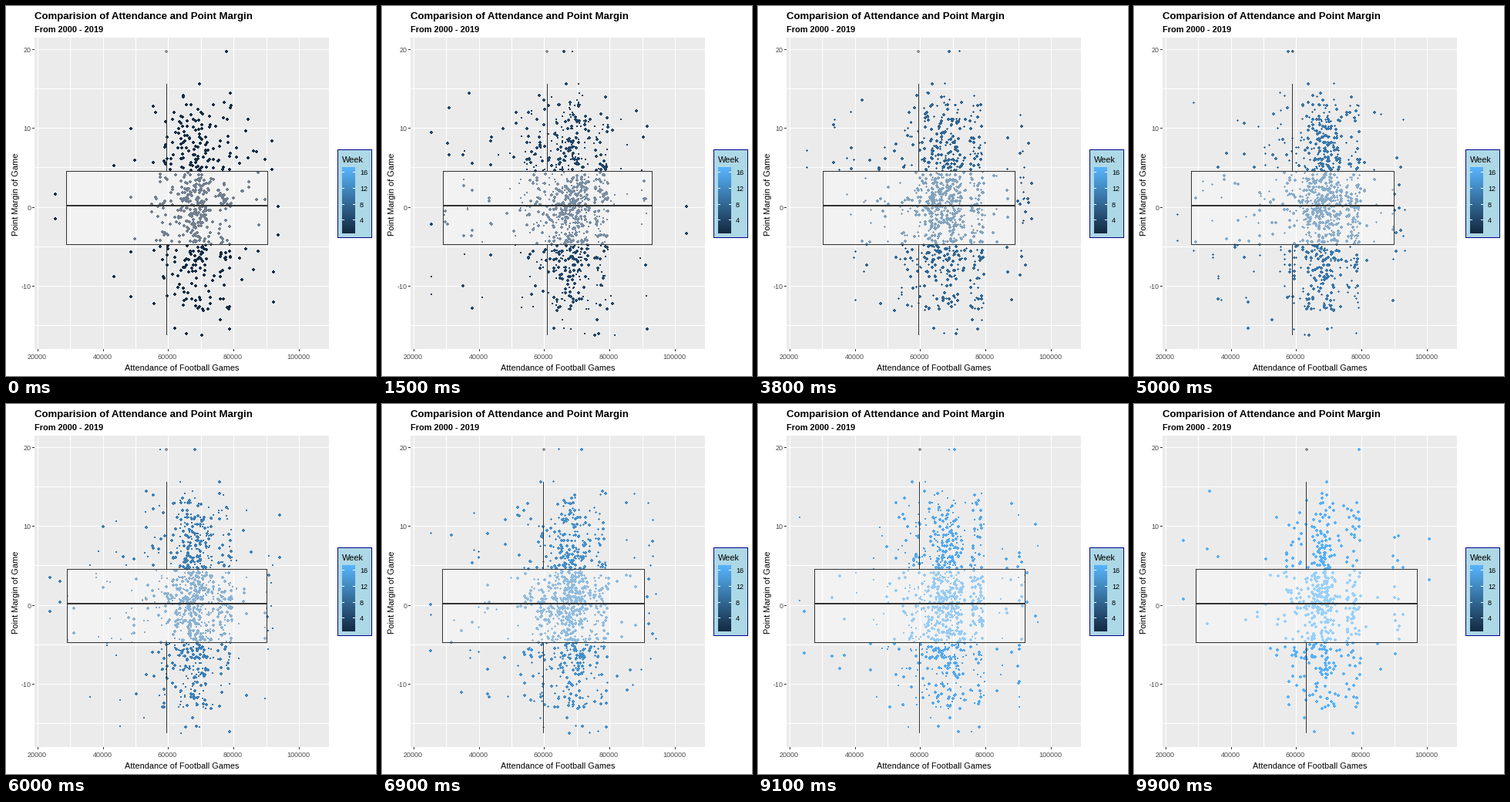
A matplotlib script that plays this animation: 480 by 480 pixels, repeating every 10000 ms.

```python
import numpy as np
import matplotlib.pyplot as plt
from matplotlib.animation import FuncAnimation
from matplotlib.collections import PolyCollection
from matplotlib.patches import Rectangle

plt.rcParams["font.family"] = ["Liberation Sans", "DejaVu Sans"]

FRAMES, WEEKS, TEAMS = 100, 17, 580
LOW, HIGH = np.array([19, 43, 67]) / 255, np.array([86, 177, 247]) / 255
DARK = "#333333"

# Per week, in pixels: attendance extremes and the top team's place
LO = [63.5, 54, 64, 63.5, 55, 59, 64, 98, 56.5, 80, 57, 64, 63, 64.5, 54, 60, 64.5]
HI = [353, 402, 342.5, 395, 353, 353, 345, 355, 352, 346, 355, 355, 351, 363, 363, 360, 383]
TOP = [286, 240, 247, 235.5, 250, 232, 261, 248, 205, 200, 245, 230, 259, 236, 248, 255, 292]
KEYS = np.floor(np.arange(WEEKS) * (FRAMES - 1) / (WEEKS - 1) + 0.4999).astype(int)


def px(v):
    return 41.2 + (v - 20000) * 0.00424


def py(v):
    return 261.02 - v * 10.23


def week_color(w):
    return LOW + (HIGH - LOW) * w / (WEEKS - 1)


fig = plt.figure(figsize=(480 / 72, 480 / 72), dpi=72, facecolor="white")
ax = fig.add_axes([0, 0, 1, 1])
ax.set(xlim=(0, 480), ylim=(480, 0))
ax.axis("off")


def bar(x0, y0, x1, y1, color, z=1, alpha=None):
    r = Rectangle((x0, y0), x1 - x0, y1 - y0, fc=color, lw=0, alpha=alpha,
                  antialiased=False, zorder=z)
    return ax.add_patch(r)


def move(r, x0, y0, x1, y1):
    r.set_bounds(x0, y0, x1 - x0, y1 - y0)


def label(x, y, s, size, color="black", **kw):
    ax.text(x, y, s, fontsize=size, color=color, zorder=9, **kw)


# Panel, grid and axes
bar(37, 41, 419, 445, "#EBEBEB")
for v in range(-15, 21, 5):
    y = int(py(v))
    bar(37, y, 419, y + 1, "white", 2)
    if v % 10 == 0:
        bar(34, y, 37, y + 1, DARK, 2)
        label(32.5, y + 4, str(v), 9, "#4D4D4D", ha="right")
for v in range(20000, 100001, 10000):
    x = int(px(v))
    bar(x, 41, x + 1, 445, "white", 2)
    if v % 20000 == 0:
        bar(x, 445, x + 1, 448, DARK, 2)
        label(x - 0.5, 458, str(v), 9, "#4D4D4D", ha="center")

label(37, 17, "Comparision of Attendance and Point Margin", 13.3, weight="bold")
label(37, 34, "From 2000 - 2019", 11, weight="bold")
label(228, 473, "Attendance of Football Games", 10.9, ha="center")
label(18, 244.5, "Point Margin of Game", 11, rotation=90, ha="right", va="center")

# Legend
bar(430, 186, 475, 301, "#00008B", 1)
bar(431, 187, 474, 300, "#ADD8E6", 2)
label(436, 203, "Week", 11)
for y in range(209, 295):
    t = np.clip(((295 - y) / 86 - 0.025) / 0.95, 0, 1)
    bar(436, y, 453, y + 1, LOW + (HIGH - LOW) * t, 3)
for w in (4, 8, 12, 16):
    y = int(295.2 - 86.6 * (0.025 + 0.95 * (w - 1) / 16))
    bar(436, y, 439, y + 1, "white", 4)
    bar(450, y, 453, y + 1, "white", 4)
    label(459, y + 4, str(w), 9)

# Season margins stay fixed per team; attendance is drawn anew every week
rng = np.random.default_rng(2019)
margin = np.round(np.clip(rng.normal(0.1, 6.8, TEAMS), -16.2, 14.5) * 16) / 16
hot = np.abs(margin) > 13
margin[hot] *= rng.uniform(0.5, 1, hot.sum())
margin[:6] = 19.75, 15.65, 14.5, -16.2, -16.0, 13.0


def attendance(w, n):
    tail = 0.015 if w in (0, WEEKS - 1) else 0.04
    share = np.array([0.69, 0.15, 0.09, tail, 0.02, 0.018])
    kind = rng.choice(6, n, p=share / share.sum())
    lo, hi = LO[w], HI[w]
    picks = [
        rng.triangular(204, 250, 273, n),
        rng.uniform(275, 293, n),
        rng.triangular(168, 208, 212, n),
        rng.triangular(lo, 170, 172, n),
        rng.uniform(293, 330, n),
        rng.uniform(335, min(hi, 352), n),
    ]
    return np.choose(kind, picks)


def week_points(w):
    games = attendance(w, TEAMS // 2)
    x = np.repeat(games, 2)
    order = rng.permutation(TEAMS)
    y = margin[order]
    keep = rng.random(TEAMS) < (0.92 if w in (0, WEEKS - 1) else 0.84)
    keep |= y > 15
    x = np.clip(x, LO[w], HI[w])
    x[y > 19] = TOP[w]
    inner = np.flatnonzero(np.abs(y) < 12)
    x[inner[:2]], x[inner[2:4]] = LO[w], HI[w]
    keep[inner[:4]] = True
    return np.column_stack([x[keep], py(y[keep])])


points = [week_points(w) for w in range(WEEKS)]


def dots(xy, s):
    """Hard-edged round dots, s pixels across, on the pixel grid."""
    c, e = (1, s - 1) if s > 2 else (0, s)
    shape = np.array([(c, 0), (e, 0), (e, c), (s, c), (s, e), (e, e),
                      (e, s), (c, s), (c, e), (0, e), (0, c), (c, c)])
    return np.round(xy - s / 2)[:, None, :] + shape


def layer(z, **kw):
    return ax.add_collection(PolyCollection([], lw=0, antialiased=False, zorder=z, **kw),
                             autolim=False)


leaving, current = layer(3), layer(4)
outlier = layer(6, facecolor=DARK, alpha=0.5)
fill = bar(0, 0, 1, 1, "white", 5, 0.4)
top, bottom, left, right, median, upper, lower = [bar(0, 0, 1, 1, DARK, 6) for _ in range(7)]


def update(i):
    w = min(int(np.searchsorted(KEYS, i)), WEEKS - 1)
    prev = max(w - 1, 0)
    p = 1.0 if w == 0 else (i - KEYS[prev]) / (KEYS[w] - KEYS[prev])

    current.set_verts(dots(points[w], 4))
    current.set_facecolor(week_color(w))
    if p < 1:
        leaving.set_verts(dots(points[prev], 3 if p < 0.35 else 2))
        leaving.set_facecolor(week_color(prev))
    else:
        leaving.set_verts([])

    # The box is centred on the attendance range and covers 90% of it
    lo = LO[prev] + (LO[w] - LO[prev]) * p
    hi = HI[prev] + (HI[w] - HI[prev]) * p
    mid, half = (lo + hi) / 2, 0.45 * (hi - lo)
    x0, x1, xm = round(mid - half), round(mid + half), int(mid)
    move(fill, x0, 214, x1 + 1, 310)
    move(top, x0, 214, x1 + 1, 215)
    move(bottom, x0, 309, x1 + 1, 310)
    move(left, x0, 214, x0 + 1, 310)
    move(right, x1, 214, x1 + 1, 310)
    move(median, x0, 258, x1 + 1, 260)
    move(upper, xm, 101, xm + 1, 214)
    move(lower, xm, 310, xm + 1, 427)
    outlier.set_verts(dots(np.array([[xm + 0.5, py(19.75)]]), 4))
    return ()


anim = FuncAnimation(fig, update, frames=FRAMES, interval=100, repeat=True,
                     repeat_delay=0, cache_frame_data=False)
plt.show()
```
